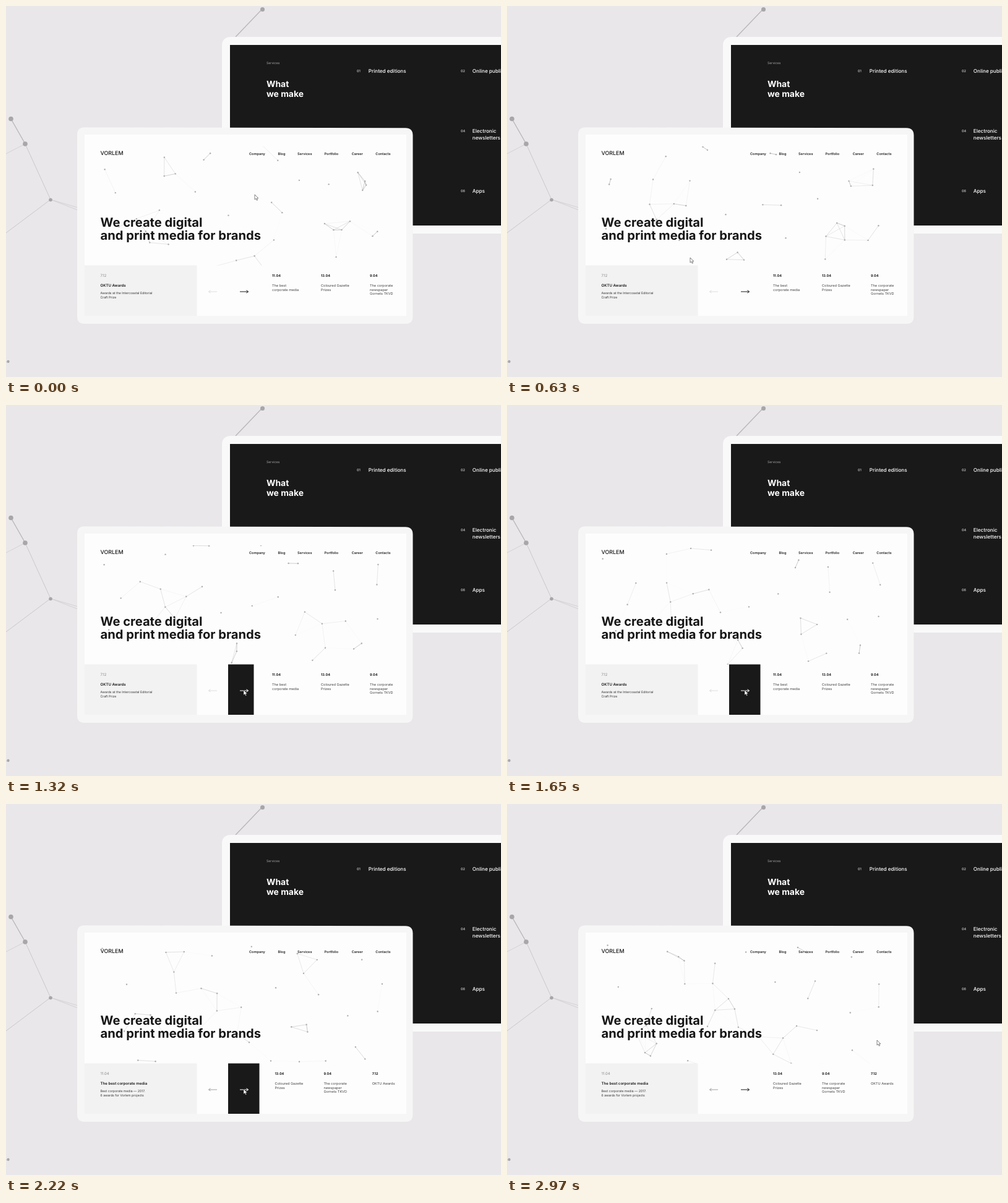
Write an HTML page with a canvas that moves like this. It is 800x600 px and loops after 3000 ms.

```html
<!DOCTYPE html>
<html lang="en">
<head>
<meta charset="utf-8">
<style>
html, body { margin: 0; width: 100%; height: 100%; overflow: hidden; background: #e9e7ea; }
svg, canvas { position: absolute; left: 0; top: 0; width: 800px; height: 600px; }
canvas { mix-blend-mode: multiply; }
text { font-family: Inter, "Open Sans", sans-serif; text-rendering: geometricPrecision; }
</style>
</head>
<body>
<svg viewBox="0 0 800 600">
  <clipPath id="columns"><rect x="400" y="420" width="247" height="80"/></clipPath>
  <g fill="none" stroke="#c9c7ca">
    <path d="M414 5L371 50M8 182.5L31 223" stroke="#b9b7ba" stroke-width="1.4"/>
    <path d="M31 223L72 313L0 367"/>
    <path d="M72 313L116 326M72 313L116 330M31 223L0 239M0 576L4 575" stroke="#d3d1d4"/>
  </g>
  <g fill="#a8a6a9">
    <circle cx="414.5" cy="5.5" r="3.5"/><circle cx="8" cy="182.5" r="3.8"/>
    <circle cx="31" cy="223" r="3.8"/><circle cx="72" cy="313.5" r="2.8"/><circle cx="3.5" cy="575" r="2.2"/>
  </g>
  <rect x="349" y="50" width="480" height="318" rx="13" fill="#f9f9fa"/>
  <rect x="362" y="63" width="450" height="292" fill="#191919"/>
  <g id="back"></g>
  <path d="M127 196.2L645.5 197.2q12 0 12 12V502q0 12 -12 12H127q-12 0 -12 -12V208.2q0 -12 12 -12Z" fill="#f6f6f6"/>
  <rect x="127" y="208" width="520" height="293" fill="#fdfdfd"/>
  <rect x="127" y="419.5" width="181.5" height="81.5" fill="#f2f2f2"/>
  <g id="front"></g>
  <g id="list" clip-path="url(#columns)"></g>
  <rect id="hover" x="359" y="419.5" height="81.5" fill="#191919"/>
  <g fill="none">
    <path id="prev" d="M341 462h-13.5m3 -2.2l-3 2.2l3 2.2"/>
    <path id="next" d="M378 462h13.5m-3 -2.2l3 2.2l-3 2.2"/>
  </g>
  <path id="cursor" d="M0 0V8L1.9 6.4L3.3 9.3L4.6 8.7L3.3 5.9H5.8Z" fill="#fff" stroke="#333" stroke-width=".6"/>
</svg>
<canvas id="net" width="800" height="600"></canvas>
<script>
const $ = id => document.getElementById(id);
const NS = 'http://www.w3.org/2000/svg';
const LOOP = 3000;

function add(parent, tag, attrs = {}) {
  const el = document.createElementNS(NS, tag);
  for (const k in attrs) el.setAttribute(k, attrs[k]);
  return parent.appendChild(el);
}

function write(parent, x, y, size, weight, fill, lines, leading = 6.6) {
  lines.split('|').forEach((line, i) => {
    const attrs = { x, y: y + i * leading, 'font-size': size, 'font-weight': weight, fill };
    add(parent, 'text', attrs).textContent = line;
  });
}

// Back screen: services in two columns, partly covered by the front screen
const back = $('back');
write(back, 421, 94, 5.2, 400, '#aaa', 'Services');
write(back, 421, 131, 13.9, 700, '#fff', 'What|we make', 15.5);
['Printed editions', 'Online publications', 'Video', 'Electronic|newsletters', 'Websites', 'Apps']
  .forEach((name, i) => {
    const x = 567 + 168 * (i % 2), y = 107 + 97 * (i >> 1);
    write(back, x, y, 5.4, 500, '#ddd', '0' + (i + 1));
    write(back, x + 18.8, y + 1.3, 8.15, 500, '#fff', name, 10.5);
  });

// Front screen
const front = $('front');
write(front, 152.5, 241, 8.9, 500, '#151515', 'VORLEM');
write(front, 152.5, 357.3, 20.15, 700, '#151515', 'We create digital|and print media for brands', 20.7);
[[393, 'Company'], [439.5, 'Blog'], [471, 'Services'], [514.5, 'Portfolio'], [558.7, 'Career'], [597.3, 'Contacts']]
  .forEach(([x, name]) => write(front, x, 240.6, 5.55, 600, '#222', name));

function card(date, title, body) {
  const g = add(front, 'g');
  write(g, 152.5, 437.7, 6, 400, '#888', date);
  write(g, 152.5, 454.2, 6.1, 600, '#191919', title);
  write(g, 152.5, 466.3, 5.15, 400, '#333', body);
  return g;
}
const oldCard = card('7.12', 'OKTU Awards', 'Awards at the Intercoastal Editorial|Craft Prize');
const newCard = card('11.04', 'The best corporate media', 'Best corporate media — 2017.|6 awards for Vorlem projects');

const STEP = 79;
const columns = [
  ['11.04', 'The best|corporate media'],
  ['13.04', 'Coloured Gazette|Prizes'],
  ['9.04', 'The corporate|newspaper|Gornets TKVD'],
  ['7.12', 'OKTU Awards']
].map(([date, body]) => {
  const g = add($('list'), 'g');
  write(g, 0, 437.5, 5.5, 700, '#191919', date);
  write(g, 0, 454, 5.55, 400, '#444', body);
  return g;
});

const clamp = v => Math.max(0, Math.min(1, v));
const span = (t, start, length) => clamp((t - start) / length);
const mix = (a, b, p) => a + (b - a) * p;
const smooth = p => p * p * (3 - 2 * p);
const easeOut = p => 1 - (1 - p) ** 3;
const bounce = (v, lo, hi) => v < lo ? 2 * lo - v : v > hi ? 2 * hi - v : v;

// Drifting dots, scattered one per cell of a loose grid
const box = { left: 152, right: 608.5, top: 222.5, bottom: 443 };
const COLS = 8, ROWS = 5, REACH = 48, SPEED = 27;
let seed = 11;
const random = () => (seed = seed * 16807 % 2147483647) / 2147483647;
const dots = Array.from({ length: COLS * ROWS }, (_, i) => ({
  x: mix(box.left, box.right, (i % COLS + random()) / COLS),
  y: mix(box.top, box.bottom, (Math.floor(i / COLS) + random()) / ROWS),
  vx: SPEED * (2 * random() - 1),
  vy: SPEED * (2 * random() - 1)
}));

const ctx = $('net').getContext('2d');
ctx.beginPath();
ctx.rect(127, 227, 520, 192.5);
ctx.clip();
ctx.lineWidth = .7;
ctx.fillStyle = '#b0b0b0';

function drawNet(t) {
  const sec = t / 1000;
  const drift = -2.44 + 1.5 * sec - .11 * sec * sec;
  const points = dots.map(d => [
    bounce(d.x + d.vx * drift, box.left, box.right),
    bounce(d.y + d.vy * drift, box.top, box.bottom)
  ]);
  ctx.clearRect(0, 0, 800, 600);
  points.forEach(([x, y], i) => {
    for (const [u, v] of points.slice(i + 1)) {
      const d = Math.hypot(u - x, v - y);
      if (d > REACH) continue;
      ctx.strokeStyle = `rgba(120,120,120,${.75 * (1 - d / REACH)})`;
      ctx.beginPath();
      ctx.moveTo(x, y);
      ctx.lineTo(u, v);
      ctx.stroke();
    }
    ctx.beginPath();
    ctx.arc(x, y, 1.2, 0, 7);
    ctx.fill();
  });
}

// Pointer stops: time, x, y
const stops = [[60, 402, 305], [630, 296, 407], [1290, 384, 461], [2340, 384, 461], [2460, 396, 458], [2970, 598, 382]];

function pointerAt(t) {
  let [, x, y] = stops[0];
  for (let i = 1; i < stops.length; i++) {
    const [from] = stops[i - 1], [to, nx, ny] = stops[i];
    const p = smooth(span(t, from, to - from));
    x = mix(x, nx, p);
    y = mix(y, ny, p);
  }
  return `translate(${x} ${y})`;
}

function render(t) {
  drawNet(t);
  $('cursor').setAttribute('transform', pointerAt(t));

  const hover = easeOut(span(t, 1190, 300)) * (1 - easeOut(span(t, 2530, 200)));
  $('hover').setAttribute('width', 50.5 * hover);
  $('next').setAttribute('stroke', hover > .5 ? '#fff' : '#191919');

  const slide = .5 - .5 * Math.cos(Math.PI * span(t, 1752, 553));
  columns.forEach((g, i) => {
    // the last column waits just outside the screen
    const from = Math.min(430 + STEP * i, 654.5);
    g.setAttribute('transform', `translate(${mix(from, 430 + STEP * (i - 1), slide)} 0)`);
  });
  columns[0].setAttribute('opacity', clamp(1 - 2.7 * slide));

  oldCard.setAttribute('opacity', 1 - span(t, 1750, 310));
  newCard.setAttribute('opacity', span(t, 2050, 160));
  const tone = mix(222, 162, span(t, 1752, 150));
  $('prev').setAttribute('stroke', `rgb(${tone},${tone},${tone})`);
}

const start = performance.now();
function tick() {
  render((performance.now() - start) % LOOP);
  requestAnimationFrame(tick);
}
tick();
</script>
</body>
</html>
```
